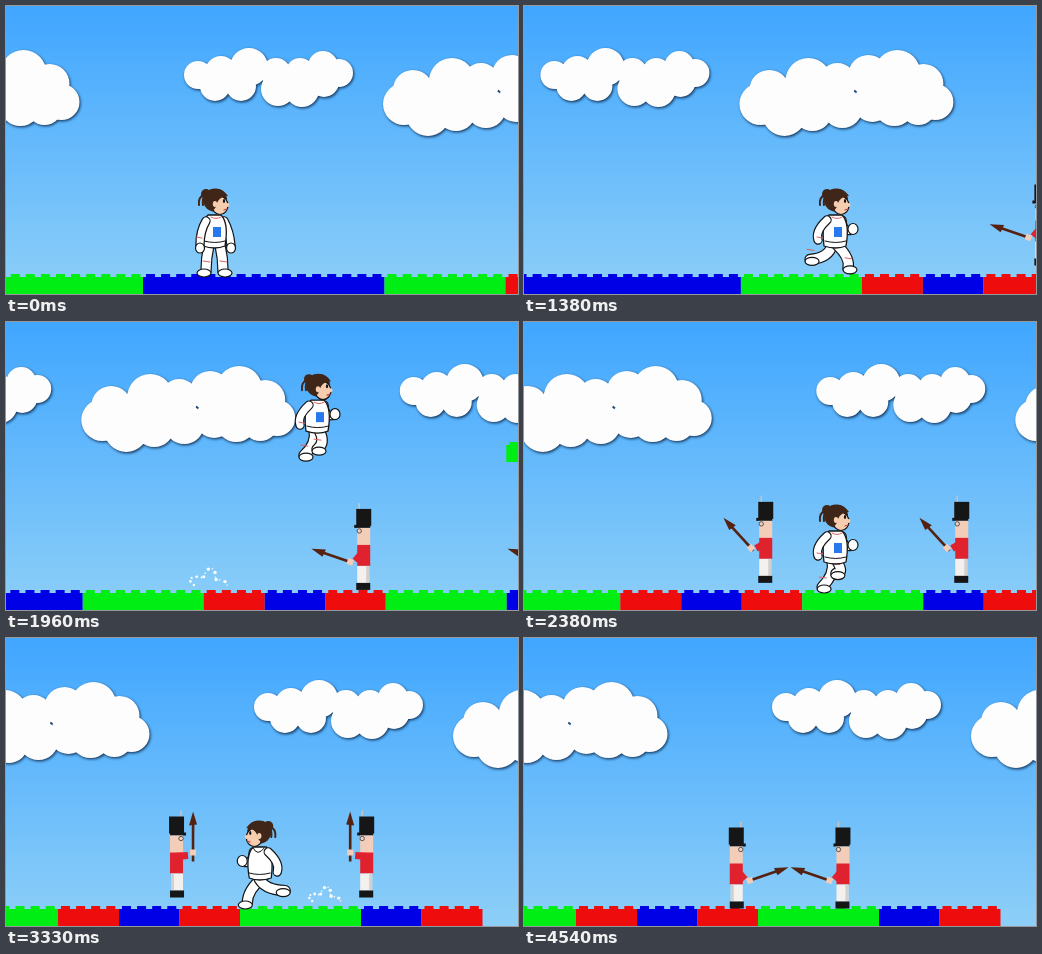
Write an HTML page with a canvas that moves like this. It is 512x288 px and loops after 4.58 s.

```html
<!DOCTYPE html>
<html lang="en">
<head>
<meta charset="utf-8">
<title>Runner and toy soldiers</title>
<style>
html, body { margin: 0; height: 100%; overflow: hidden; }
canvas { display: block; }
</style>
</head>
<body>
<canvas id="stage" width="512" height="288"></canvas>
<script>
const c = document.getElementById('stage').getContext('2d');
const LOOP = 4580, TAU = Math.PI * 2;
const GREEN = '#00ee14', BLUE = '#0000e6', RED = '#ee0c0c';
const HAIR = '#402619', SKIN = '#f7cdb0', INK = '#151515';

// Runner: [time, world x]
const path = [[0, 209], [286, 209], [2558, 758], [2822, 758], [2868, 769], [3049, 769],
  [3425, 678], [3480, 678], [3700, 731], [3760, 731], [3840, 712], [LOOP, 712]];
// Ground: [world x of the left end, colour]
const bricks = [[-104, GREEN], [137, BLUE], [378.5, GREEN], [499.5, RED], [560.5, BLUE],
  [621, RED], [681.5, GREEN], [802.5, BLUE], [863, RED], [924]];
// Cloud lobes: [x, y, radius]
const smallCloud = [[192, 69, 14], [215, 66, 16], [243, 61, 19], [270, 67, 15], [294, 66, 14],
  [317, 60, 15], [333, 67, 14], [209, 80, 15], [235, 80, 15], [272, 83, 17], [296, 84, 17], [318, 76, 15]];
const bigCloud = [[398, 98, 21], [407, 84, 20], [446, 75, 23], [475, 76, 19], [506, 69, 20],
  [535, 67, 23], [561, 78, 20], [573, 96, 18], [422, 108, 22], [450, 105, 20], [480, 102, 20],
  [510, 97, 19], [532, 99, 21], [556, 101, 18]];

const clamp = (v, a, b) => Math.min(b, Math.max(a, v));

function box(color, x, y, w, h) {
  c.fillStyle = color;
  c.fillRect(x, y, w, h);
}

function oval(color, x, y, rx, ry = rx, outline) {
  c.beginPath();
  c.ellipse(x, y, rx, ry, 0, 0, TAU);
  c.fillStyle = color;
  c.fill();
  if (outline) { c.strokeStyle = INK; c.lineWidth = 1.2; c.stroke(); }
}

function line(color, width, ...p) {
  c.beginPath();
  c.moveTo(p[0], p[1]);
  if (p.length > 4) c.quadraticCurveTo(p[2], p[3], p[4], p[5]);
  else c.lineTo(p[2], p[3]);
  c.strokeStyle = color;
  c.lineWidth = width;
  c.stroke();
}

function limb(width, ...p) {
  line(INK, width + 2.4, ...p);
  line('#fff', width, ...p);
}

function runnerAt(t) {
  const i = path.findIndex((p, n) => n && t <= p[0]);
  const [t0, x0] = path[i - 1], [t1, x1] = path[i];
  let facing = 1;
  for (let n = 1; n <= i; n++) facing = Math.sign(path[n][1] - path[n - 1][1]) || facing;
  return { x: x0 + (x1 - x0) * (t - t0) / (t1 - t0), running: x1 !== x0, since: t - t0, facing };
}

// Double jump
function jumpHeight(t) {
  const rise = d => 1.2 * d - 0.00284 * d * d;
  if (t < 1505) return 0;
  return Math.max(0, t < 1879 ? rise(t - 1505) : rise(374) + rise(t - 1879));
}

function drawCloud(lobes, dx) {
  c.beginPath();
  for (const [x, y, r] of lobes) {
    c.moveTo(x + dx + r, y);
    c.arc(x + dx, y, r, 0, TAU);
  }
  c.save();
  c.shadowColor = 'rgba(0,20,50,.8)';
  c.shadowBlur = 3;
  c.shadowOffsetX = 1;
  c.shadowOffsetY = 1.3;
  c.fillStyle = '#fdfdfd';
  c.fill();
  c.restore();
}

function drawScene(scroll) {
  const sky = c.createLinearGradient(0, 0, 0, 288);
  sky.addColorStop(0, '#40a6ff');
  sky.addColorStop(1, '#8dcff8');
  box(sky, 0, 0, 512, 288);
  for (let k = -1; k < 3; k++) {
    drawCloud(smallCloud, k * 517.5 - scroll);
    drawCloud(bigCloud, k * 517.5 - scroll);
  }
  for (let i = 0; i < bricks.length - 1; i++) {
    const [x, color] = bricks[i], end = bricks[i + 1][0];
    box(color, x - scroll, 271, end - x, 17);
    for (let s = x + 3; s < end - 5; s += 15.1) box(color, s - scroll, 268, 9, 3);
  }
}

function drawBrick(x, y) {
  box(GREEN, x, y + 3, 60, 17);
  for (let i = 0; i < 4; i++) box(GREEN, x + 3 + i * 15, y, 9, 3);
}

function drawSoldier(x, facing, hop, raise) {
  c.save();
  c.translate(x, 270.5 - hop);
  c.scale(facing, 1);
  line('#c9c3c0', 1.5, 5, -87, 5, -80);
  box('#161616', -7, -81, 15, 17);
  box('#161616', -6, -65, 16, 3);
  box('#f4cdb9', -6, -62, 13, 18);
  c.beginPath();
  c.arc(5, -59, 2.2, 0, TAU);
  c.strokeStyle = '#555';
  c.lineWidth = 1;
  c.stroke();
  box('#e0222f', -6, -45, 13, 21);
  box('#f3f0ee', -5, -24, 12, 17);
  box('#d2cfd0', -5, -24, 3, 17);
  box('#161616', -6, -7, 14, 7);
  const hx = 14 + 3 * raise, hy = -28 - 17 * raise;
  c.lineCap = 'butt';
  line('#e0222f', 7, -1, -41, hx - 5, hy - 1 + 4 * raise);
  c.translate(hx, hy);
  c.rotate(-0.33 - 1.24 * raise);
  line('#552211', 2.6, -9 * raise, 0, 30, 0);
  c.beginPath();
  c.moveTo(41, 0);
  c.lineTo(27, -4);
  c.lineTo(28, 4);
  c.fillStyle = '#552211';
  c.fill();
  box('#f4cdb9', -3, -3, 6, 6);
  c.restore();
}

function drawHead() {
  line(HAIR, 2, -11, -82, -17, -80, -16, -72);
  line(HAIR, 2, -10, -82, -13, -78, -12, -72);
  oval(HAIR, -9, -83, 5);
  oval(HAIR, 0, -77, 12, 11.5);
  oval(SKIN, 5, -71.5, 8, 9, true);
  oval(SKIN, 12.5, -72, 2);
  c.beginPath();
  c.moveTo(-9, -82);
  c.quadraticCurveTo(3, -95, 13, -81);
  c.quadraticCurveTo(5, -81, 2, -74);
  c.quadraticCurveTo(0, -64, -6, -68);
  c.fillStyle = HAIR;
  c.fill();
  oval(SKIN, 0, -73, 2.2, 3);
  oval(INK, 9, -76, 1.1, 2);
  line('#c44', 1.2, 9, -67, 12, -68);
}

function stepFoot(phase) {
  const p = phase % 1;
  const lift = p > 0.36 ? 15 * Math.sqrt(Math.sin(Math.PI * (p - 0.36) / 0.64)) : 0;
  return [-7 + 19 * Math.cos(TAU * p), -4 - lift];
}

function drawRunner(x, height, r, suit) {
  const active = r.running || height > 0;
  let feet = [[-9, -4], [8, -4]];
  if (height > 0) feet = [[-14, -5], [-1, -11]];
  else if (r.running) feet = [stepFoot(r.since / 550 + 0.5), stepFoot(r.since / 550)];
  c.save();
  c.translate(x, 271 - height);
  c.scale(r.facing, 1);
  c.lineCap = c.lineJoin = 'round';

  if (active) limb(7, 6, -57, 7, -44, 16, -47);
  else limb(7, 9, -56, 15, -45, 16, -31);
  feet.forEach(([fx, fy], i) => {
    const hip = active ? -4 + i * 5 : -6 + i * 11;
    const knee = active ? (hip + fx) / 2 + 8 : fx;
    limb(9, hip, -32, knee, -19, fx, fy - 2);
    oval('#fff', fx + (active ? 2 : i * 4 - 2), fy, 7, 4, true);
    if (suit) line('#e06060', 1, fx - 3, fy - 12, fx + 4, fy - 11);
  });
  c.beginPath();
  c.moveTo(-7, -62);
  c.quadraticCurveTo(-15, -55, -12, -31);
  c.quadraticCurveTo(0, -27, 10, -31);
  c.quadraticCurveTo(14, -54, 6, -62);
  c.closePath();
  c.fillStyle = '#fff';
  c.fill();
  c.strokeStyle = INK;
  c.lineWidth = 1.3;
  c.stroke();
  line(INK, 1, -11, -36, 0, -33, 10, -36);
  if (suit) {
    box('#2879ee', -2, -50, 8, 10);
    line('#e06060', 1, -4, -60, 1, -57, 6, -60);
  } else line(INK, 1, -5, -61, 2, -52, 6, -61);
  if (active) {
    limb(7, -9, -57, -21, -46, -18, -37);
    oval('#fff', 17, -48, 5, 5.5, true);
  } else {
    limb(7, -9, -56, -15, -46, -15, -32);
    oval('#fff', -15, -29, 4.5, 5, true);
    oval('#fff', 16, -29, 4.5, 5, true);
  }
  if (suit) line('#e06060', 1, -19, -40, -13, -39);
  drawHead();
  c.restore();
}

function drawDust(x, age) {
  if (age < 0 || age > 480) return;
  const grow = Math.sqrt(age / 455);
  for (let i = 0; i < 15; i++) {
    const a = Math.PI * (1 + i / 14), spread = 0.8 + 0.25 * Math.sin(i * 7.3);
    oval('#fff', x + 18 * grow * spread * Math.cos(a), 263 + 16 * grow * spread * Math.sin(a), 1.2 + 0.5 * Math.sin(i * 3));
  }
}

function draw(t) {
  const r = runnerAt(t);
  const scroll = clamp(runnerAt(Math.min(t, 2868)).x - 312, 0, 447.5);
  drawScene(scroll);
  if (t < 2360) drawBrick(802 - scroll, 120);

  const hop = 11 * Math.max(0, Math.cos(TAU * (t - 1380) / 325));
  const raise = clamp((t - 2300) / 200, 0, 1) - clamp((t - 3650) / 200, 0, 1);
  const walk = d => 0.0345 * d, turn = 3261;
  const turned = t > turn;
  const first = 660 - walk(Math.min(t, turn) - 1960) + walk(Math.max(0, t - turn));
  drawSoldier(first - scroll, turned ? 1 : -1, hop, raise);
  drawSoldier(856 - walk(t - 1960) - scroll, -1, hop, raise);

  drawDust(504 - scroll, t - 1505);
  drawDust(766 - scroll, t - 3000);
  if (t < 4150) drawRunner(r.x - scroll, jumpHeight(t), r, t < 2600);
}

function frame() {
  draw(performance.now() % LOOP);
  requestAnimationFrame(frame);
}
frame();
</script>
</body>
</html>
```
